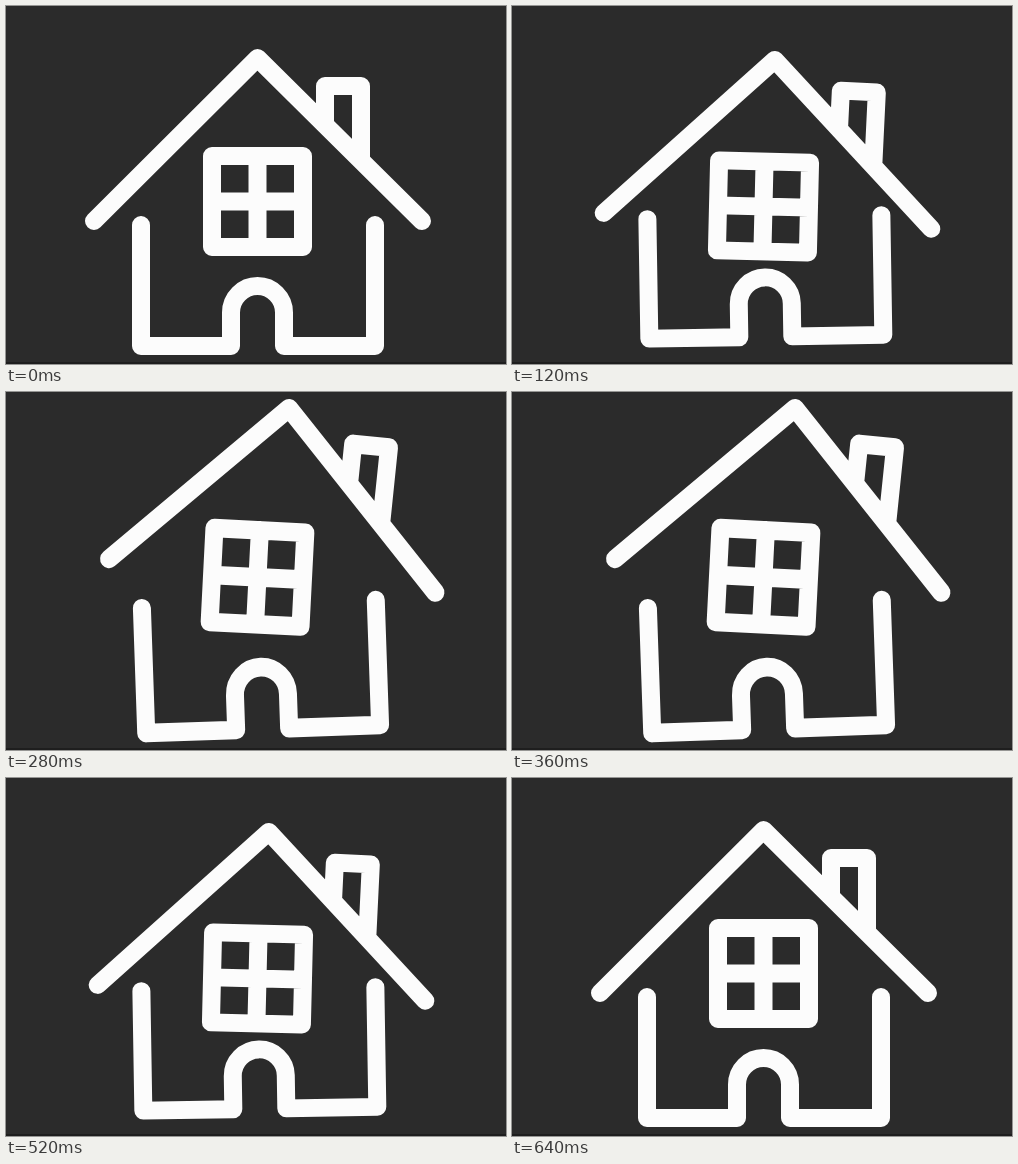
Write an HTML page that moves like this. It is 500 px wide and 358 px high and loops after 1440 ms.

```html
<!DOCTYPE html>
<html lang="en">
<head>
<meta charset="utf-8">
<title>House</title>
<style>
  html, body { margin: 0; height: 100%; overflow: hidden; background: #2b2b2b; }
  svg { display: block; width: 100%; height: 100%; }
  g { fill: none; stroke: #fcfcfc; stroke-width: 18; stroke-linecap: round; stroke-linejoin: round; }
</style>
</head>
<body>
<svg viewBox="0 0 500 358">
  <rect y="356" width="500" height="2" fill="#1e1e1e"/>
  <!-- each part is drawn around its own pivot -->
  <g id="body"><path d="M-116.5 23.5V144.5H-26.5V111a26.5 26.5 0 0 1 53 0V144.5H117.5V23.5"/></g>
  <g id="window"><path d="M-45.5 -45.5h91v91h-91zM0 -45.5v91M-45.5 0h91"/></g>
  <g id="roof"><path d="M-163.5 0L0 -163L164.5 0M67.5 -98V-135H103.5V-63"/></g>
</svg>
<script>
const LOOP = 1440, STEP = 40, MOVE = 640, DIP = 80, PEAK = MOVE / 2;
const MID = 251.5;

// pivot height, full tilt, drop in the squash, then rise and slide in the leap
const parts = [
  { id: "roof",   y: 215,   tilt: 6.25, drop: 10,   rise: 45, slide: 15.5 },
  { id: "window", y: 195.5, tilt: 3.1,  drop: 10,   rise: 22, slide: 0 },
  { id: "body",   y: 195.5, tilt: -2.1, drop: -7.6, rise: 0,  slide: 0 }
];

const clamp = v => Math.max(0, Math.min(1, v));

function draw(now) {
  const t = Math.floor(now % LOOP / STEP) * STEP;
  // the way back mirrors the way out
  const u = Math.min(t, MOVE - t);
  const squash = clamp(u / DIP);
  const leap = 1 - (1 - clamp((u - DIP) / (PEAK - DIP))) ** 1.4;
  const stretch = 1 - .025 * squash + .063 * leap;
  const lean = .28 * squash + .72 * leap;

  for (const { id, y, tilt, drop, rise, slide } of parts) {
    const px = MID + slide * leap;
    const py = y + drop * squash - rise * leap;
    document.getElementById(id).setAttribute("transform",
      `translate(${px} ${py}) rotate(${tilt * lean}) scale(1 ${stretch})`);
  }
}

const start = performance.now();
function tick() {
  draw(performance.now() - start);
  requestAnimationFrame(tick);
}
tick();
</script>
</body>
</html>
```
